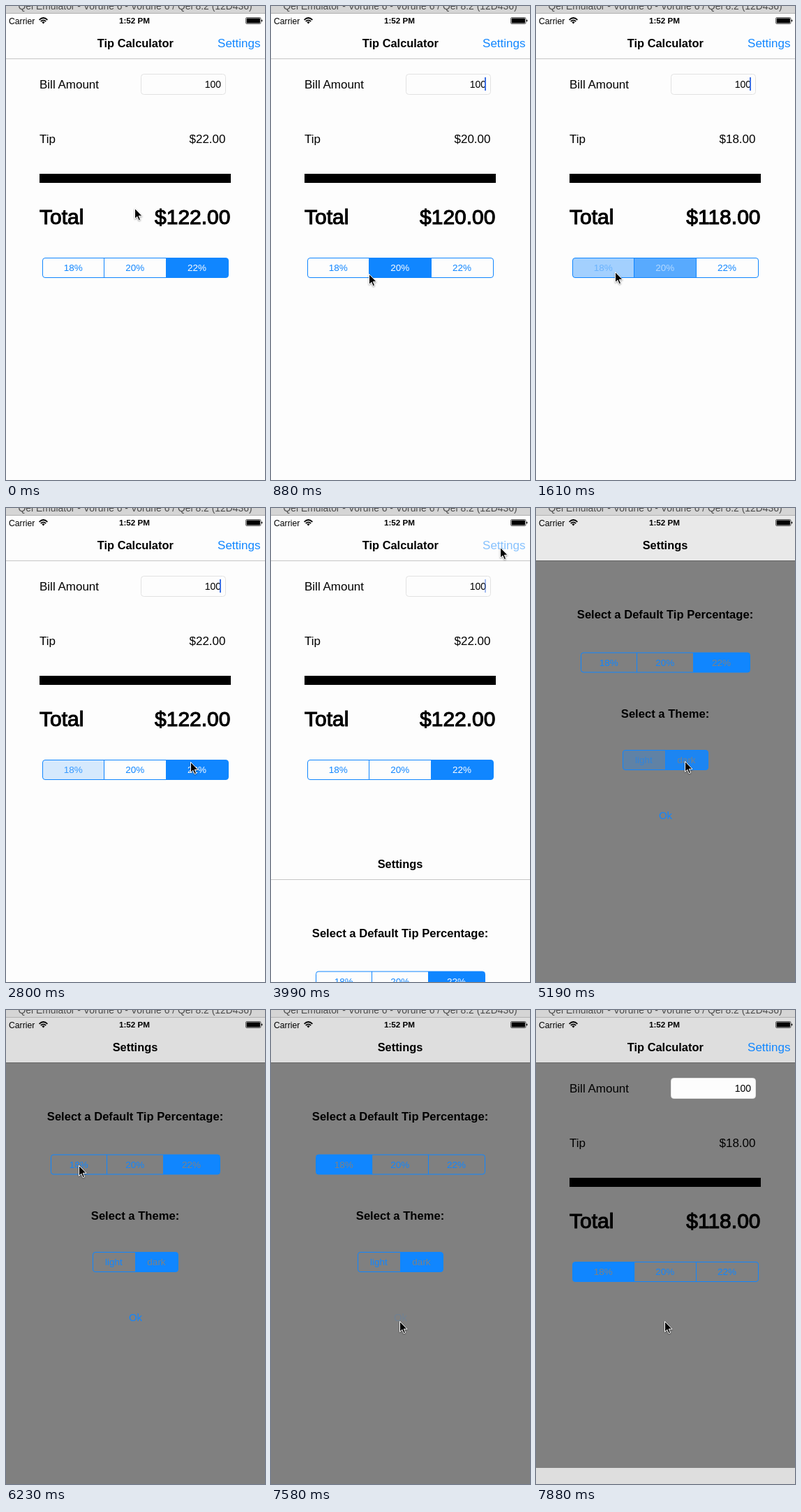
Write an HTML page that moves like this. It is 371 px wide and 678 px high and loops after 8 s.

```html
<!DOCTYPE html>
<html lang="en">
<head>
<meta charset="utf-8">
<title>Tip Calculator</title>
<style>
  html, body { margin: 0; width: 100%; height: 100%; overflow: hidden; }
  svg { display: block; width: 371px; height: 678px; --blue: #1086ff; }
  text { font: 17px "Liberation Sans", Arial, sans-serif; white-space: pre; }
  .bold { font-weight: bold; }
  .mid { text-anchor: middle; }
  .end { text-anchor: end; }
  .title { font-size: 16.4px; }
  .head { font-size: 16.6px; }
  .big { font-size: 30px; stroke: #000; stroke-width: 1.1px; }
  .seg { font-size: 13.5px; }
  .blue { fill: var(--blue); }
  .page { fill: var(--bg); }
  .nav { fill: var(--nav); }
  .rule { fill: #000; opacity: .22; }
</style>
</head>
<body>
<svg id="stage" viewBox="0 0 371 678">
  <g id="main">
    <rect class="page" y="11" width="371" height="667"/>
    <rect class="nav" y="11" width="371" height="64"/>
    <rect class="rule" y="75" width="371" height="1"/>
    <text class="bold title mid" x="185.3" y="59">Tip Calculator</text>
    <text id="link" class="blue end" x="364.5" y="59">Settings</text>
    <text x="48" y="117.5">Bill Amount</text>
    <rect x="193.5" y="97.5" width="121" height="29" rx="4" fill="#fdfdfd" stroke="#e2e2e2"/>
    <text class="end" x="308" y="117" style="font-size:14px">100</text>
    <rect id="caret" x="306" y="102" width="2" height="19" fill="#3c6fe4"/>
    <text x="48" y="196">Tip</text>
    <text id="tip" class="end" x="314.5" y="196"></text>
    <rect x="48" y="240" width="274" height="13"/>
    <text class="big" x="48" y="311.5">Total</text>
    <text id="total" class="big end" x="321.5" y="311.5"></text>
  </g>
  <g id="sheet">
    <rect class="page" y="11" width="371" height="667"/>
    <rect class="nav" y="11" width="371" height="64"/>
    <rect class="rule" y="75" width="371" height="1"/>
    <text class="bold title mid" x="185" y="59">Settings</text>
    <text class="bold head mid" x="185" y="158">Select a Default Tip Percentage:</text>
    <text class="bold head mid" x="185" y="299.5">Select a Theme:</text>
    <text id="ok" class="blue mid" x="185.5" y="445" style="font-size:15px">Ok</text>
  </g>
  <g id="status">
    <text x="4" y="25.5" style="font-size:12.2px">Carrier</text>
    <g fill="none" stroke="#000" stroke-width="1.7">
      <path d="M47.6 19.8Q53.5 14.2 59.4 19.8M49.8 22Q53.5 18.6 57.2 22"/>
      <path d="M51.4 23.2Q53.5 21.4 55.6 23.2L53.5 25.6Z" fill="#000" stroke="none"/>
    </g>
    <text class="bold mid" x="184" y="25.2" style="font-size:11.7px">1:52 PM</text>
    <rect x="343.5" y="16.5" width="21.5" height="9" rx="1.5" fill="none" stroke="#000" stroke-width=".6"/>
    <rect x="344.6" y="17.6" width="19.3" height="6.8" rx=".5"/>
    <rect x="365.8" y="19.5" width="1.4" height="3" rx=".7"/>
    <rect width="371" height="10" fill="#d5d5d5"/>
    <rect y="10" width="371" height="1" fill="#b2b2b2"/>
    <text class="mid" x="185" y="5" fill="#4c4c4c" style="font-size:13.9px">Qel Emulator - Vorune 6 - Vorune 6 / Qel 8.2 (12D436)</text>
  </g>
  <path id="pointer" d="M.5 .5V15.3L3.9 12.2 6.2 17.6 8.6 16.6 6.3 11.3H11Z" stroke="#fff"
        style="filter:drop-shadow(0 1px 1px #0006)"/>
</svg>
<script>
const LOOP = 8000;
const STEP = 148.8;      // screen refresh interval
const LEAD = 30;         // the first refresh comes this much early
const FADE_IN = 160, FADE_OUT = 200;
const MOVE = 600;        // length of every pointer move

const $ = id => document.getElementById(id);
const clamp = v => Math.min(1, Math.max(0, v));

function add(parent, tag, attrs, text = '') {
  const el = document.createElementNS('http://www.w3.org/2000/svg', tag);
  for (const key in attrs) el.setAttribute(key, attrs[key]);
  el.textContent = text;
  return parent.appendChild(el);
}

// Where the pointer rests, and when it gets there
const stops = [
  { at: 0, x: 184, y: 289 },
  { at: 600, x: 186, y: 388 },
  { at: 1310, x: 108, y: 380 },
  { at: 2200, x: 262, y: 374 },
  { at: 3390, x: 328, y: 56 },
  { at: 4740, x: 213, y: 362 },
  { at: 6230, x: 104, y: 222 },
  { at: 7130, x: 184, y: 445 }
];

function pointerAt(t) {
  let { x, y } = stops[0];
  for (const stop of stops) {
    const k = 1 - (1 - clamp((t - stop.at + MOVE) / MOVE)) ** 3;
    x += (stop.x - x) * k;
    y += (stop.y - y) * k;
  }
  return `${Math.round(x)} ${Math.round(y)}`;
}

// Segmented control; choices are [time, index]. Returns its update function.
function segmented(parent, x, y, width, labels, choices) {
  const height = 28, id = `clip${x}`;
  const box = { x, y, width, height, rx: 3.5 };
  const edge = i => Math.floor(x + width * i / labels.length - .5) + .5;
  add(add(parent, 'clipPath', { id }), 'rect', box);
  const fills = add(parent, 'g', { 'clip-path': `url(#${id})` });
  const parts = labels.map((label, i) => {
    const left = edge(i), w = x + width * (i + 1) / labels.length - left;
    if (i) add(parent, 'path', { d: `M${left} ${y}v${height}`, stroke: 'var(--blue)' });
    return {
      fill: add(fills, 'rect', { x: left, y, width: w, height, class: 'blue' }),
      text: add(parent, 'text', { x: left + w / 2 - .5, y: y + 18.5, class: 'seg mid' }, label)
    };
  });
  add(parent, 'rect', { ...box, fill: 'none', stroke: 'var(--blue)' });

  return t => {
    const n = choices.findLastIndex(([time]) => time <= t);
    const [since, now] = choices[n];
    const before = n ? choices[n - 1][1] : -1;
    parts.forEach(({ fill, text }, i) => {
      const level = i === now ? (n ? clamp((t - since) / FADE_IN) : 1)
        : i === before ? 1 - clamp((t - since) / FADE_OUT) : 0;
      fill.style.opacity = level;
      text.style.fill = `color-mix(in srgb, var(--bg) ${level * 100}%, var(--blue))`;
    });
    return now;
  };
}

const tips = [18, 20, 22];
const percents = tips.map(p => `${p}%`);
const updateTip = segmented($('main'), 52.5, 360.5, 266, percents,
  [[0, 2], [620, 1], [1546, 0], [2630, 2], [6500, 0]]);
const updateDefault = segmented($('sheet'), 64.5, 207, 242, percents, [[0, 2], [6480, 0]]);
const updateTheme = segmented($('sheet'), 124.5, 346.5, 122, ['light', 'dark'], [[0, 0], [5035, 1]]);

// Critically damped spring from 0 to 1
function spring(ms) {
  const s = Math.max(0, ms) / 50;
  return 1 - (1 + s) * Math.exp(-s);
}

function caretAt(t) {
  const focused = t > 100 && t < 5000;
  return focused ? clamp(1.8 + 1.6 * Math.cos(2 * Math.PI * (t / 1000 - .58))) : 0;
}

function render(t) {
  const dark = updateTheme(t) === 1;
  $('stage').style.setProperty('--bg', dark ? '#808080' : '#fdfdfd');
  $('stage').style.setProperty('--nav', !dark ? '#fdfdfd' : t < 5300 ? '#e9e9e9' : '#dedede');

  const tip = tips[updateTip(t)];
  $('tip').textContent = `$${tip}.00`;
  $('total').textContent = `$${100 + tip}.00`;
  updateDefault(t);

  $('caret').style.opacity = caretAt(t);
  $('link').style.opacity = t < 3660 ? 1 : clamp(.2 + Math.max(0, t - 3840) / 500);
  $('ok').style.opacity = t < 7550 ? 1 : .14;

  const drop = 667 * (1 - spring(t - 3930.5) + spring(t - 7596));
  $('sheet').setAttribute('transform', `translate(0 ${Math.round(drop)})`);
  $('pointer').setAttribute('transform', `translate(${pointerAt(t)})`);
}

function frame() {
  const refresh = Math.floor((performance.now() % LOOP + LEAD) / STEP);
  render(Math.max(0, refresh * STEP - LEAD));
  requestAnimationFrame(frame);
}
frame();
</script>
</body>
</html>
```
